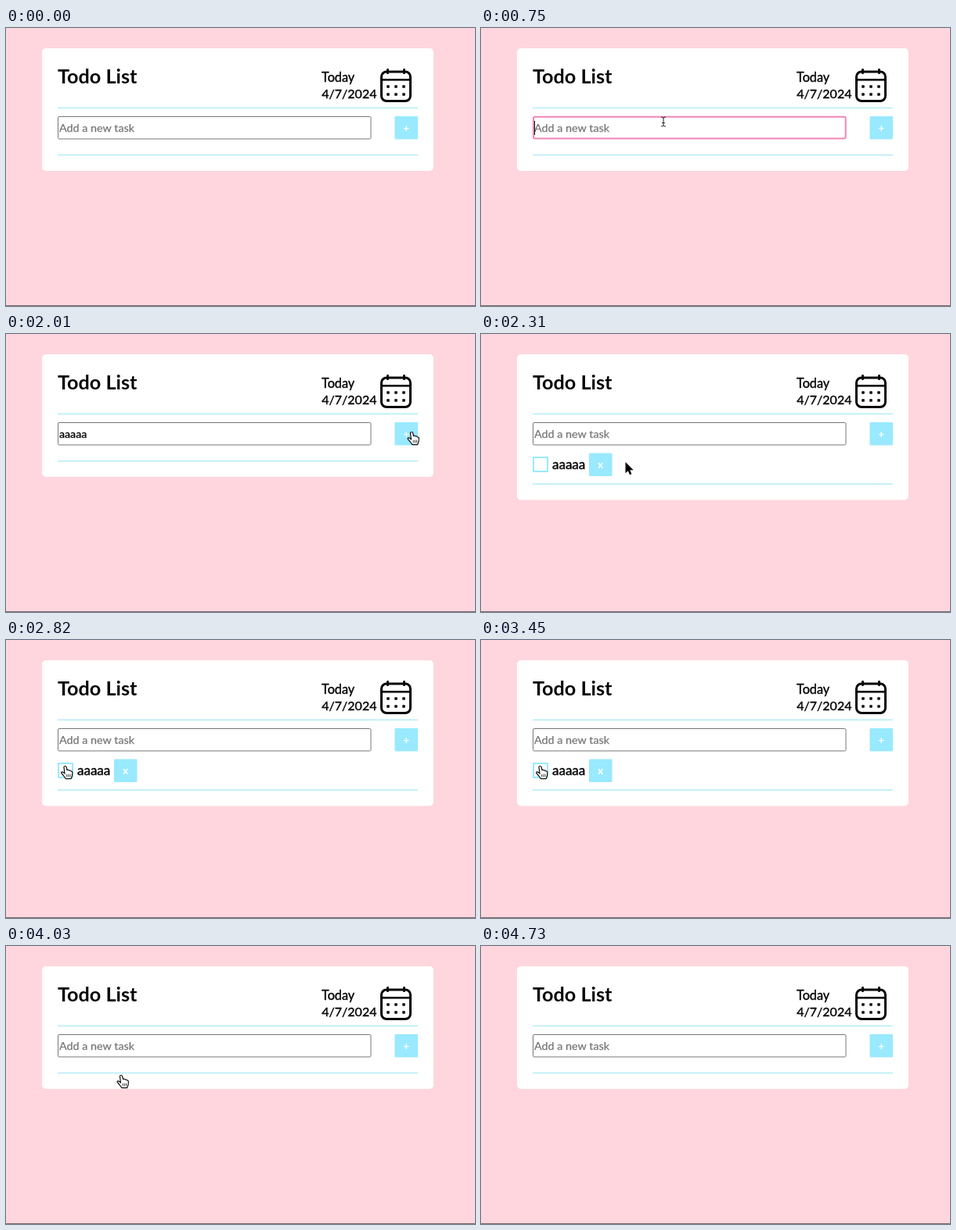
Recreate the animation shown at these times as an HTML page with a canvas. Size 599x356 px, loop 4830 ms.

```html
<!DOCTYPE html>
<html lang="en">
<head>
<meta charset="utf-8">
<title>Todo List</title>
<style>
  html, body { margin: 0; width: 100%; height: 100%; overflow: hidden; background: #ffd6dd; }
  canvas { display: block; width: 599px; height: 356px; }
</style>
</head>
<body>
<canvas id="stage"></canvas>
<script>
const W = 599, H = 356, LOOP = 4830;
const PINK = '#ffd6dd', BLUE = '#99e9ff', LINE = '#b8edf8', INK = '#050607';

const canvas = document.getElementById('stage');
const ctx = canvas.getContext('2d');
const ratio = window.devicePixelRatio || 1;
canvas.width = W * ratio;
canvas.height = H * ratio;

// The screen refreshes only at these times.
const TICKS = [0, 120, 220, 320, 420, 520, 620, 750, 850, 950, 1050, 1150, 1230,
  1310, 1420, 1520, 1620, 1720, 1840, 2010, 2110, 2210, 2310, 2430, 2520,
  2610, 2730, 2830, 2950, 3450, 3550, 3640, 3730, 3900, 4030,
  4330, 4430, 4530, 4630, 4730];

// Pointer waypoints: time, x, y.
const PATH = [
  [120, 588, 176], [620, 233, 120], [1310, 233, 120], [1840, 518, 125.5],
  [2110, 518, 125.5], [2310, 184.5, 164], [2610, 75.5, 161.5],
  [3450, 75.5, 161.5], [3730, 147, 165.5], [4330, 147, 165.5], [4730, 610, 250]
];

const FOCUS = 750, BLUR = 2010, ADD = 2110, CHECK = 2830, UNCHECK = 3450, REMOVE = 3900;
const KEYS = [850, 950, 1050, 1150, 1230];

const between = (t, a, b) => t >= a && t < b;
const inside = (p, x, y, w, h) => p.x >= x && p.x <= x + w && p.y >= y && p.y <= y + h;

function pointerAt(t) {
  const i = Math.max(1, PATH.findIndex(k => k[0] > t));
  const [t0, x0, y0] = PATH[i - 1], [t1, x1, y1] = PATH[i];
  const u = Math.min(1, Math.max(0, (t - t0) / (t1 - t0)));
  const e = u * u * (3 - 2 * u);
  return { x: x0 + (x1 - x0) * e, y: y0 + (y1 - y0) * e };
}

function box(x, y, w, h, r, fill, stroke, width) {
  ctx.beginPath();
  ctx.roundRect(x, y, w, h, r);
  if (fill) { ctx.fillStyle = fill; ctx.fill(); }
  if (stroke) { ctx.strokeStyle = stroke; ctx.lineWidth = width; ctx.stroke(); }
}

function text(str, x, y, size, { weight = 400, color = INK, bold = 0, align = 'left' } = {}) {
  ctx.font = `${weight} ${size}px Lato, "Open Sans", sans-serif`;
  ctx.textAlign = align;
  ctx.fillStyle = ctx.strokeStyle = color;
  ctx.fillText(str, x, y);
  if (bold) {
    ctx.lineWidth = bold;
    ctx.lineJoin = 'round';
    ctx.strokeText(str, x, y);
  }
}

function rule(y) {
  ctx.fillStyle = LINE;
  ctx.fillRect(66, y, 460, 1.6);
}

function button(x, y, label) {
  box(x, y, 29.5, 29.5, 1, BLUE);
  text(label, x + 14.7, y + 19.5, 14, { weight: 700, color: '#fff', align: 'center' });
}

function calendar() {
  box(479.5, 56, 37, 37.5, 6.5, null, INK, 3);
  ctx.fillStyle = INK;
  ctx.fillRect(479, 65, 38, 2.6);
  for (const x of [487.5, 508.5]) box(x - 1.5, 52, 3, 7, 1.2, INK);
  for (const y of [75, 85])
    for (const x of [488, 498, 508]) box(x - 1.8, y - 1.8, 3.6, 3.6, 0.8, INK);
}

function input(t) {
  const focused = between(t, FOCUS, BLUR);
  if (focused) box(67, 113.8, 398.7, 27.8, 2, '#fff', '#f284b8', 2);
  else box(66.5, 113.5, 399.5, 28.5, 1.5, '#fff', '#777', 1);

  const typed = t < ADD ? 'a'.repeat(KEYS.filter(k => t >= k).length) : '';
  if (typed) text(typed, 68, 133, 14.2, { bold: 0.3 });
  else text('Add a new task', 68, 133, 14.3, { color: '#757575', bold: 0.25 });
  if (focused) {
    ctx.font = '400 14.2px Lato, "Open Sans", sans-serif';
    const x = 68 + ctx.measureText(typed).width;
    ctx.fillStyle = INK;
    ctx.fillRect(x, 119, 1, 18);
  }
}

function task(done) {
  box(67, 158, 18, 18, 0.5, done ? BLUE : '#fff', BLUE, 2);
  text('aaaaa', 91, 173, 17, { bold: 0.45 });
  if (done) {
    ctx.fillStyle = INK;
    ctx.fillRect(91, 167.5, 42.5, 1.2);
  }
  button(138, 152.5, 'x');
}

const ARROW = new Path2D('M0 0V14.2L3.3 11.2L5.5 16.2L7.9 15.2L5.7 10.3H10.2Z');
const BEAM = new Path2D('M-2.5 -6Q0 -6 0 -4.5Q0 -6 2.5 -6M0 -4.5V4.5M-2.5 6Q0 6 0 4.5Q0 6 2.5 6M-1.5 1.5H1.5');
const HAND = new Path2D('M-1.6 1Q0 -1 1.6 1L2.5 5.2Q4.2 4 5.2 5.7Q7 4.9 7.6 6.6' +
  'Q9.3 6.3 9.4 8.2L9.1 12L7.6 16.2H0.9L-1.8 12.5L-5 8.7Q-4.4 6.4 -2.2 8L-0.5 9.5Z');
const KNUCKLES = new Path2D('M2.2 10.8V13.6M4.4 10.6V13.6M6.5 10.6V13.4');

function pointer(t) {
  if (t < 120 || between(t, KEYS[0], 1310) || t >= 4730) return;
  const p = pointerAt(t);
  const overTask = between(t, ADD, 4330) &&
    (inside(p, 66, 157, 20, 20) || inside(p, 138, 152, 30, 30));
  ctx.save();
  ctx.translate(p.x, p.y);
  ctx.lineJoin = ctx.lineCap = 'round';
  if (inside(p, 66, 113, 400, 29)) {
    ctx.strokeStyle = '#222';
    ctx.lineWidth = 1;
    ctx.stroke(BEAM);
  } else if (overTask || inside(p, 497, 113, 30, 30)) {
    ctx.fillStyle = '#fff';
    ctx.strokeStyle = '#111';
    ctx.lineWidth = 1.2;
    ctx.fill(HAND);
    ctx.stroke(HAND);
    ctx.lineWidth = 0.8;
    ctx.stroke(KNUCKLES);
  } else {
    ctx.strokeStyle = '#fff';
    ctx.lineWidth = 1.6;
    ctx.stroke(ARROW);
    ctx.fillStyle = '#000';
    ctx.fill(ARROW);
  }
  ctx.restore();
}

function draw(t) {
  const hasTask = between(t, ADD, REMOVE);
  const extra = hasTask ? 29.5 : 0;
  ctx.setTransform(ratio, 0, 0, ratio, 0, 0);
  ctx.fillStyle = PINK;
  ctx.fillRect(0, 0, W, H);
  ctx.fillStyle = '#78696c';
  ctx.fillRect(0, 355, W, 1);

  box(46, 26, 500, 157 + extra, 5, '#fff');
  text('Todo List', 66, 71, 25.2, { weight: 700 });
  text('Today', 403, 69, 16.3, { bold: 0.4 });
  text('4/7/2024', 403.3, 90, 16, { bold: 0.4 });
  calendar();
  rule(101.5);
  input(t);
  button(496.5, 113, '+');
  if (hasTask) task(between(t, CHECK, UNCHECK));
  rule(161.8 + extra);
  pointer(t);
}

function frame() {
  const now = performance.now() % LOOP;
  draw(TICKS.filter(k => k <= now).pop());
  requestAnimationFrame(frame);
}
frame();
</script>
</body>
</html>
```
